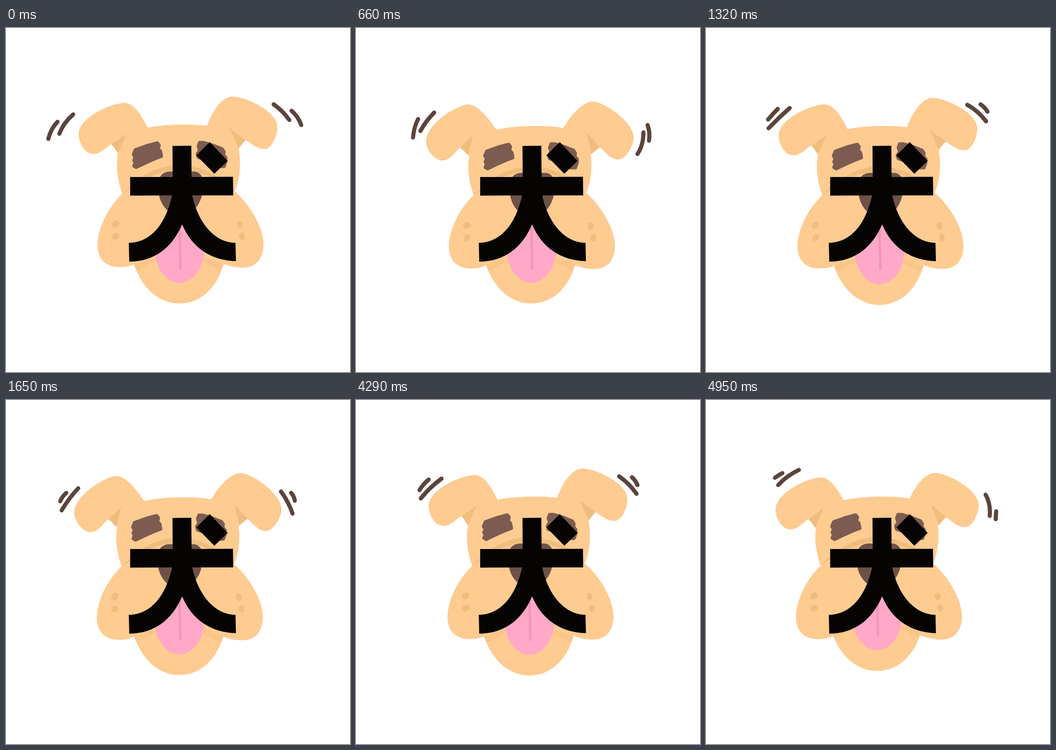
Animation of 748 by 748 pixels, one loop 5.28 s. Source, as an HTML page with a canvas:

```html
<!DOCTYPE html>
<html lang="ja">
<head>
<meta charset="utf-8">
<title>犬</title>
<style>
html, body { margin: 0; width: 100%; height: 100%; overflow: hidden; background: #fff; }
canvas { display: block; width: 748px; height: 748px; }
</style>
</head>
<body>
<canvas id="stage" width="748" height="748"></canvas>
<script>
const ctx = document.getElementById('stage').getContext('2d');
const FUR = '#fecb91', SHADE = '#eebe7d', SOFT = '#fac588', BROW = '#7c5c50';
const NOSE = '#6e5147', LINE = '#5b443d', PINK = '#ffa8c8', CREASE = '#f394b8', INK = '#050403';
const P = d => new Path2D(d);

const skull = P('M253 361C240 325 239 295 244 270C250 240 262 228 305 217.5C340 209 405 208 440 213C480 225 495 238 506 262C511 295 510 325 497 356Z');
const muzzle = P('M253 360C218 394 199 440 199 472C199 505 220 520 247 520C262 520 272 517 278 514L377 490L474 513C486 518 500 521 515 521C545 521 560 500 560 470C560 440 537 390 497 355L377 298Z');
const fold = P('M253 361C290 318 335 298 377 298C420 298 462 318 498 356C462 326 420 309 377 309C335 309 290 330 253 361Z');
const nose = P('M331 342C331 322 341 312 358 312L408 312C422 312 431 324 429 345C428 380 406 408 380 408C352 408 329 380 331 342Z');
const brows = [
  P('M281 265L306 256L329 250L333 255L331 263L336 268L338 279L322 285L304 293L283 303L278 300L281 293L278 288L281 281L277 275Z'),
  P('M421 249L430 249L450 255L470 263L474 269L473 276L478 282L478 290L474 301L464 301L440 289L418 281L416 274L421 266L418 257Z')
];
const spots = [[238, 426, 9, 7, -0.6], [238.5, 453, 8.5, 6.8, -0.6], [507.5, 427, 6.4, 8, -0.2], [513, 453, 6.4, 8, -0.1]];
const chin = P('M278 514C298 570 335 599 377 599C420 599 456 570 473 514L460 470L290 470Z');
const chinShade = P('M279 515L287 528Q302 517 324 508L318 500ZM473 514L464 527Q448 517 427 508L433 500Z');
const tongue = P('M323 485C326 525 350 554 377 554C405 554 428 525 432 485C426 460 405 440 396 415L366 415C355 440 328 460 323 485Z');
const crease = P('M377.500 436L379 522');
const kanji = P('M362 256.500L403 256L403.500 324L493.500 323.500L494 364L405 364C418 425 455 467 499 467L500 507C447 506 404 478 383 427C361 478 322 508 268 508L267 467C315 467 348 425 361 364L270 364.500L270 324L362.500 324ZM443 248L482 289L453 317L414 277Z');

// each ear turns around the inner tip of its fold
const ears = [
  { x: 262, y: 230,
    body: P('M315 232L308 217C295 190 278 163 258 163C229 163 157 195 158 232C158 250 172 274 190 274C207 274 218 258 230 252L243 272L290 272Z'),
    flap: P('M262 230L229 253Q238 262 243 272Q253 251 262 230Z') },
  { x: 486, y: 218,
    body: P('M428 228L437 213C447 185 468 149 492 149C523 149 591 183 590 215C590 235 578 263 562 263C545 263 535 252 521 244L506 262L460 265Z'),
    flap: P('M486 218L521 244Q510 253 506 262Q497 240 486 218Z') }
];

// head and chin: offsets; ears: [tip x, tip y, degrees]; marks: motion lines
const poses = [
  { head: [0, 0], chin: [0, 0], ears: [[262, 230, 0], [486, 218, 0]],
    marks: P('M92 241Q98 218 112 204M116 230Q125 206 146 188M582 166Q602 180 616 200M621 180Q635 192 642 211') },
  { head: [-3.5, 0], chin: [-5, -10], ears: [[255, 235, -2], [489, 227, 3.5]],
    marks: P('M150 169Q158 163 166 159M157 185Q175 165 202 152M608 206Q619 225 617 252M631 242Q630 252 630 259') },
  { head: [3, 3], chin: [4, 0], ears: [[255, 232, -10], [501, 227, 11]],
    marks: P('M124 238Q126 215 135 198M140 224Q152 202 170 184M612 274Q625 255 625 227M634 211Q640 228 637 245') },
  { head: [0, 0], chin: [0, 0], ears: [[262, 230, 0], [486, 218, 0]],
    marks: P('M138 196Q146 183 158 173M141 214Q160 190 186 171M572 166Q594 181 610 204M600 168Q608 175 612 185') },
  { head: [0, 3], chin: [0, 3], ears: [[262, 233, 0], [486, 221, 0]],
    marks: P('M135 199Q145 187 156 176M136 218Q158 195 182 174M568 167Q592 180 609 203M597 166Q607 173 612 182') },
  { head: [-1.5, 1.5], chin: [0, -1], ears: [[251, 231, -10], [496, 226, 11]],
    marks: P('M118 220Q122 210 131 202M121 240Q137 213 157 192M598 199Q615 222 623 247M620 202Q627 210 628 219') }
];
const STEP = 330;
const order = [0, 1, 2, 3, 4, 5, 5, 5, 5, 5, 5, 5, 4, 3, 2, 1];

function fill(path, color) {
  ctx.fillStyle = color;
  ctx.fill(path);
}

function stroke(path, color, width) {
  ctx.strokeStyle = color;
  ctx.lineWidth = width;
  ctx.stroke(path);
}

function shifted([x, y], paint) {
  ctx.save();
  ctx.translate(x, y);
  paint();
  ctx.restore();
}

function drawEars(places, part, color) {
  ears.forEach((ear, i) => {
    const [x, y, deg] = places[i];
    ctx.save();
    ctx.translate(x, y);
    ctx.rotate(deg * Math.PI / 180);
    ctx.translate(-ear.x, -ear.y);
    fill(ear[part], color);
    ctx.restore();
  });
}

function drawFace() {
  fill(fold, SHADE);
  fill(nose, NOSE);
  for (const brow of brows) {
    fill(brow, BROW);
    stroke(brow, BROW, 7);
  }
  ctx.fillStyle = SHADE;
  for (const [x, y, rx, ry, turn] of spots) {
    ctx.beginPath();
    ctx.ellipse(x, y, rx, ry, turn, 0, Math.PI * 2);
    ctx.fill();
  }
}

function draw(pose) {
  ctx.fillStyle = '#fff';
  ctx.fillRect(0, 0, 748, 748);
  ctx.lineCap = ctx.lineJoin = 'round';
  drawEars(pose.ears, 'body', FUR);
  shifted(pose.chin, () => fill(chin, FUR));
  shifted(pose.head, () => {
    fill(skull, FUR);
    fill(muzzle, FUR);
  });
  drawEars(pose.ears, 'flap', SHADE);
  shifted(pose.chin, () => {
    fill(chinShade, SOFT);
    fill(tongue, PINK);
    stroke(crease, CREASE, 5);
  });
  shifted(pose.head, drawFace);
  stroke(pose.marks, LINE, 9);
  fill(kanji, INK);
}

const start = performance.now();
function tick(now) {
  const step = Math.floor(Math.max(0, now - start) / STEP) % order.length;
  draw(poses[order[step]]);
  requestAnimationFrame(tick);
}
tick(start);
</script>
</body>
</html>
```
